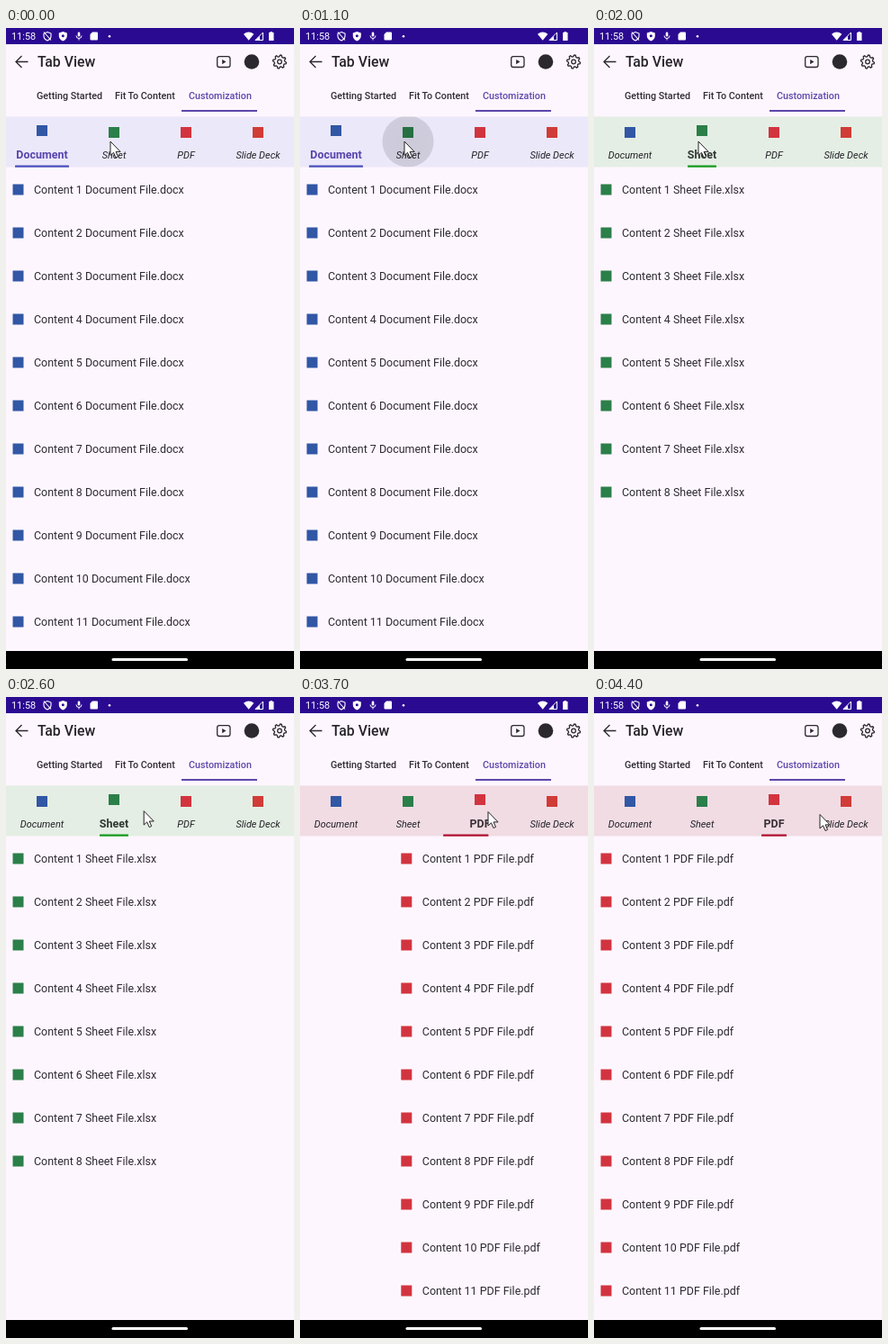
These frames come from a looping animation (320x712 px, 4500 ms). An HTML page:

```html
<!DOCTYPE html>
<html lang="en">
<head>
<meta charset="utf-8">
<title>Tab View</title>
<style>
  html, body { margin: 0; width: 100%; height: 100%; overflow: hidden; background: #fef6fe; }
  svg { display: block; font-family: Roboto, sans-serif; }
  #stage { width: 100vw; height: 100vh; }
  .line { fill: none; stroke: #2b292e; stroke-width: 1.3; }
  .top { font-size: 10.75px; font-weight: 500; fill: #302d34; }
  .label { font-size: 10.9px; font-style: italic; text-anchor: middle; fill: #222126; }
  .label.on { font-size: 12.46px; font-style: normal; font-weight: 700; }
  .row { font-size: 12.46px; fill: #2d2a31; }
</style>
</head>
<body>
<svg id="stage" viewBox="0 0 320 712">
  <defs>
    <radialGradient id="ink">
      <stop id="core" offset="0" stop-color="#000"/>
      <stop offset="1" stop-color="#000" stop-opacity=".12"/>
    </radialGradient>
  </defs>
  <rect width="320" height="712" fill="#fef6fe"/>

  <!-- status bar -->
  <rect width="320" height="18" fill="#2a0a91"/>
  <g fill="#fff">
    <text x="6" y="13" font-size="10.9">11:58</text>
    <path d="M46 4.6l4 1.5v3q0 3.2-4 5q-4-1.8-4-5v-3zM42 4.5l8 9" fill="none" stroke="#fff" stroke-width="1.1"/>
    <path d="M63.3 4l4.5 1.6v3.2q0 3.8-4.5 5.7q-4.5-1.9-4.5-5.7v-3.2z"/>
    <circle cx="63.3" cy="8.7" r="1.5" fill="#2a0a91"/>
    <rect x="79.7" y="4.5" width="2.6" height="5" rx="1.3"/>
    <path d="M78 8.5q0 3 3 3t3-3M81 11.5v2" fill="none" stroke="#fff"/>
    <path d="M96 4.5h5q1 0 1 1v7q0 1-1 1h-6.5q-1 0-1-1v-5.5z"/>
    <circle cx="115" cy="9.3" r="1.3"/>
    <path d="M264 6.8q5.7-4.6 11.4 0l-5.7 7z"/>
    <path d="M285.5 5v8.5h-8.5z" fill="none" stroke="#fff"/>
    <path d="M282 9v4.5h-5z"/>
    <path d="M293.5 4h2.5v1h1.5v9h-5.5v-9h1.5z"/>
  </g>

  <!-- app bar -->
  <path class="line" d="M24.5 37.5h-13M17.5 31l-6.5 6.5l6.5 6.5"/>
  <text x="35" y="43.3" font-size="15.8" font-weight="500" fill="#262329">Tab View</text>
  <rect class="line" x="234.7" y="31.7" width="14.3" height="11.8" rx="2.3"/>
  <path d="M240.2 35v5.2l4.3-2.6z" fill="#2b292e"/>
  <circle cx="273" cy="37.5" r="8.3" fill="#2b292e"/>
  <path id="gear" class="line"/>
  <circle class="line" cx="304" cy="37.5" r="2.3"/>
  <g class="top">
    <text x="34" y="79">Getting Started</text>
    <text x="121" y="79">Fit To Content</text>
    <text x="203" y="79" fill="#5d47ab">Customization</text>
  </g>
  <rect x="195" y="91" width="84" height="2" fill="#5d47ab"/>

  <g id="pages"></g>
  <rect id="bar" y="98.5" width="320" height="56"/>
  <g id="tabs"></g>
  <rect id="mark" y="152.5" height="2.3" rx=".5"/>
  <svg id="clip" y="98.5" width="80" height="56">
    <circle id="ripple" cx="40" cy="27.5" fill="url(#ink)"/>
  </svg>

  <rect y="692" width="320" height="20" fill="#000"/>
  <rect x="117.5" y="700" width="84.5" height="3" rx="1.5" fill="#fff"/>
  <path id="cursor" d="M0 0v15.5l3.5-3.2l2.5 5.7l2.5-1.1l-2.4-5.5h5z" fill="#fff" stroke="#222"/>
</svg>
<script>
const $ = id => document.getElementById(id);
const NS = 'http://www.w3.org/2000/svg';
const tabs = [
  { name: 'Document', ext: 'docx', rows: 11, icon: '#3157a5', bar: '#ebe8fa', mark: '#4b50bd', text: '#5944ad', span: [10, 70] },
  { name: 'Sheet', ext: 'xlsx', rows: 8, icon: '#2b7f49', bar: '#e4eee4', mark: '#169a1d', text: '#303632', span: [104, 136] },
  { name: 'PDF', ext: 'pdf', rows: 11, icon: '#d2343f', bar: '#f1dce4', mark: '#b0122f', text: '#3a3136', span: [186, 214] },
  { name: 'Slide Deck', icon: '#d03c37' }
];
const taps = [935, 2980], slides = [1382, 3431];
const LOOP = 4500, SLIDE = 400, STEP = 100;

function add(parent, tag, attrs, text = '') {
  const el = document.createElementNS(NS, tag);
  for (const k in attrs) el.setAttribute(k, attrs[k]);
  el.textContent = text;
  return parent.appendChild(el);
}
const set = (id, attrs) => { for (const k in attrs) $(id).setAttribute(k, attrs[k]); };
const clamp = v => Math.max(0, Math.min(1, v));
const mix = (a, b, p) => a + (b - a) * p;
const icon = (parent, x, y, fill) =>
  add(parent, 'rect', { x: x - 6, y: y - 6, width: 12, height: 12, fill });

tabs.forEach((tab, i) => {
  const x = 40 + 80 * i;
  tab.square = icon($('tabs'), x, 116, tab.icon);
  tab.label = add($('tabs'), 'text', { x, y: 145 }, tab.name);
  if (!tab.rows) return;
  tab.page = add($('pages'), 'g', {});
  for (let r = 0; r < tab.rows; r++) {
    const y = 179.5 + 48 * r;
    icon(tab.page, 13.5, y, tab.icon);
    add(tab.page, 'text', { x: 31, y: y + 4.3, class: 'row' }, `Content ${r + 1} ${tab.name} File.${tab.ext}`);
  }
});

const teeth = Array.from({ length: 32 }, (_, k) => {
  const a = (k + .5) * Math.PI / 16, r = k % 4 < 2 ? 7.5 : 5.7;
  return `${304 + r * Math.cos(a)} ${37.5 + r * Math.sin(a)}`;
});
set('gear', { d: `M${teeth.join('L')}Z` });

// pointer path: time, x, y
const stops = [[2400, 116, 126], [2900, 209, 127.5], [4200, 209, 127.5], [4500, 272, 132]];
function pointer(t) {
  const k = stops.findIndex(s => t < s[0]);
  if (k < 1) return stops[0].slice(1);
  const [a, b] = [stops[k - 1], stops[k]], p = (t - a[0]) / (b[0] - a[0]);
  return [mix(a[1], b[1], p), mix(a[2], b[2], p)];
}

function draw(t) {
  const now = slides.filter(s => t >= s).length;
  const p = now ? clamp((t - slides[now - 1]) / SLIDE) : 1;
  const cur = tabs[now], prev = tabs[Math.max(0, now - 1)];
  const pos = now ? now - 1 + p : 0;

  tabs.forEach((tab, i) => {
    const on = i === now;
    tab.label.setAttribute('class', on ? 'label on' : 'label');
    tab.label.style.fill = on ? tab.text : '';
    tab.square.setAttribute('y', on ? 108 : 110);
    if (tab.page) tab.page.setAttribute('transform', `translate(${320 * (i - pos)})`);
  });
  set('bar', { fill: cur.bar });

  // the leading edge of the marker runs ahead of the trailing one
  const left = mix(prev.span[0], cur.span[0], p);
  const right = mix(prev.span[1], cur.span[1], clamp(1.4 * p));
  set('mark', { x: left, width: right - left, fill: cur.mark });

  const age = t - taps[now];
  const r = age > 0 ? Math.min(50, age * .173) : 0;
  set('clip', { x: 80 * (now + 1) });
  set('ripple', { r });
  set('core', { 'stop-opacity': .13 + Math.max(0, r - 29) * .01 });
  set('cursor', { transform: `translate(${pointer(t)})` });
}

const start = performance.now();
function tick() {
  const t = (performance.now() - start) % LOOP;
  draw(Math.floor(t / STEP) * STEP);
  requestAnimationFrame(tick);
}
tick();
</script>
</body>
</html>
```
